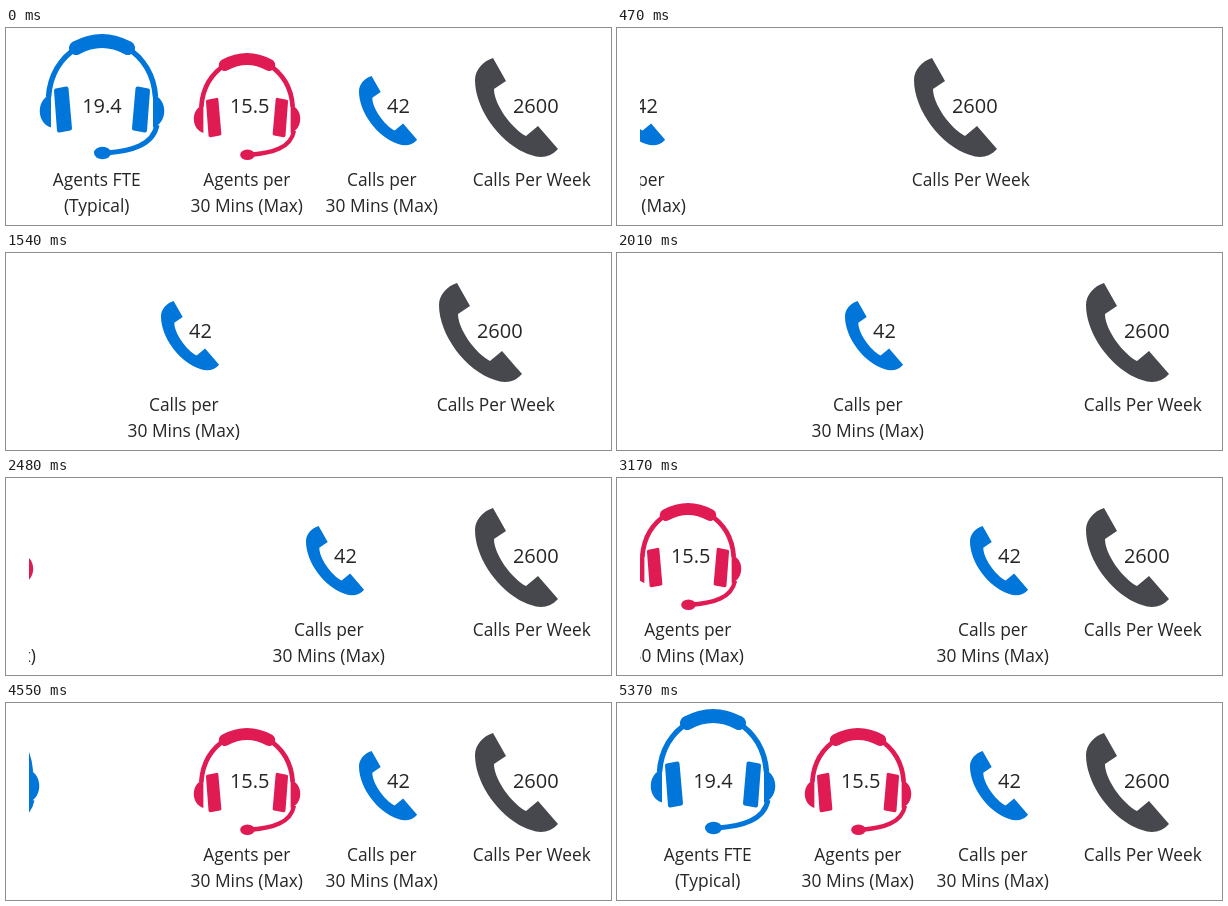
These frames come from a looping animation (605x197 px, 5840 ms). An HTML page:

```html
<!DOCTYPE html>
<html lang="en">
<head>
<meta charset="utf-8">
<title>Call centre figures</title>
<style>
  html, body { margin: 0; width: 100%; height: 100%; overflow: hidden; background: #fff; }
  svg { display: block; width: 605px; height: 197px; }
  text { font-family: "Open Sans", "Noto Sans", sans-serif; text-anchor: middle; fill: #262626; }
  .value { font-size: 20px; }
  .label { font-size: 17.33px; }
</style>
</head>
<body>
<svg viewBox="0 0 605 197">
  <defs>
    <clipPath id="panel"><rect x="23" y="0" width="582" height="197"/></clipPath>
    <g id="side">
      <path d="M8.500 63C10 42 20 24 38 13" fill="none" stroke="currentColor" stroke-width="5.500"/>
      <path d="M11 60.500C-4 65-4 89 11 93.500Z" fill="currentColor"/>
      <path d="M16 56.500L26.500 54.500L30 94.500L19 96.500Z" fill="currentColor"
            stroke="currentColor" stroke-width="4" stroke-linejoin="round"/>
    </g>
    <g id="headset">
      <use href="#side"/>
      <use href="#side" transform="matrix(-1 0 0 1 124 0)"/>
      <g fill="none" stroke="currentColor">
        <path d="M36 14Q62 0 88 14" stroke-width="14" stroke-linecap="round"/>
        <path d="M117 91C113 111 92 117 66 119" stroke-width="5"/>
      </g>
      <ellipse cx="62.500" cy="119" rx="8.500" ry="6.200" fill="currentColor"/>
    </g>
    <path id="phone" fill="currentColor"
          d="M18 0L31 23L19 31C19 46 36 70 51 78L63 68L83 91C76 99 66 101 56 97C27 88 0 52 0 22C0 12 8 3 18 0Z"/>
  </defs>
  <g id="stage" clip-path="url(#panel)"></g>
</svg>
<script>
const LOOP = 5840, CLEAR = 130, ENTER = 330, SETTLED = 5370;
const BEATS = [330, 950, 1540, 2150, 2750, 3380, 4000, 4620, 5230, 5860];
const STEPS = 9;

// path: [time, horizontal offset from the resting place]
const items = [
  { icon: "headset", color: "#0075da", x: 34, y: 6, scale: 1,
    value: ["19.4", 96], lines: ["Agents FTE", "(Typical)"], center: 90.7,
    path: [[4100, -195], [4550, -125], [5160, -30], [5370, 0]] },
  { icon: "headset", color: "#e01b54", x: 188, y: 25, scale: 0.855,
    value: ["15.5", 243.7], lines: ["Agents per", "30 Mins (Max)"], center: 240.8,
    path: [[2200, -307], [2480, -267], [3310, -150], [3860, -72], [3930, -63], [4400, 0]] },
  { icon: "phone", color: "#0075da", x: 353, y: 48, scale: 0.7,
    value: ["42", 392.5], lines: ["Calls per", "30 Mins (Max)"], center: 375.8,
    path: [[330, -385], [880, -300], [1540, -198], [2480, -53], [2690, -24], [2860, 0]] },
  { icon: "phone", color: "#47484d", x: 469, y: 30, scale: 1,
    value: ["2600", 529.8], lines: ["Calls Per Week"], center: 525.8,
    path: [[330, -190], [880, -121], [1470, -44], [1540, -36.5], [1850, 0]] }
];

const stage = document.getElementById("stage");

function add(parent, tag, attrs, text) {
  const node = document.createElementNS("http://www.w3.org/2000/svg", tag);
  for (const key in attrs) node.setAttribute(key, attrs[key]);
  if (text) node.textContent = text;
  return parent.appendChild(node);
}

for (const item of items) {
  const { icon, color, x, y, scale, value, lines, center } = item;
  item.node = add(stage, "g", {});
  add(item.node, "use", { href: "#" + icon, color, transform: `translate(${x} ${y}) scale(${scale})` });
  add(item.node, "text", { class: "value", x: value[1], y: 85 }, value[0]);
  lines.forEach((line, i) => add(item.node, "text", { class: "label", x: center, y: 158 + 26 * i }, line));
}

// Motion advances in nine held steps per beat.
function hold(t) {
  const i = BEATS.findLastIndex(beat => beat <= t);
  const step = (BEATS[i + 1] - BEATS[i]) / STEPS;
  const at = k => BEATS[i] + Math.round(k * step / 10) * 10;
  let k = STEPS - 1;
  while (at(k) > t) k--;
  return at(k);
}

function offsetAt(path, t) {
  if (t <= path[0][0]) return path[0][1];
  for (let i = 1; i < path.length; i++) {
    const [t0, x0] = path[i - 1], [t1, x1] = path[i];
    if (t < t1) return x0 + (x1 - x0) * (t - t0) / (t1 - t0);
  }
  return 0;
}

function render(time) {
  const t = time % LOOP;
  const resting = t < CLEAR || t >= SETTLED;
  const blank = t >= CLEAR && t < ENTER;
  stage.setAttribute("visibility", blank ? "hidden" : "visible");
  if (blank) return;
  const held = resting ? 0 : hold(t);
  for (const { node, path } of items) {
    const dx = resting ? 0 : Math.round(offsetAt(path, held));
    node.setAttribute("transform", `translate(${dx} 0)`);
  }
}

const start = performance.now();
function tick() {
  render(performance.now() - start);
  requestAnimationFrame(tick);
}
tick();
</script>
</body>
</html>
```
